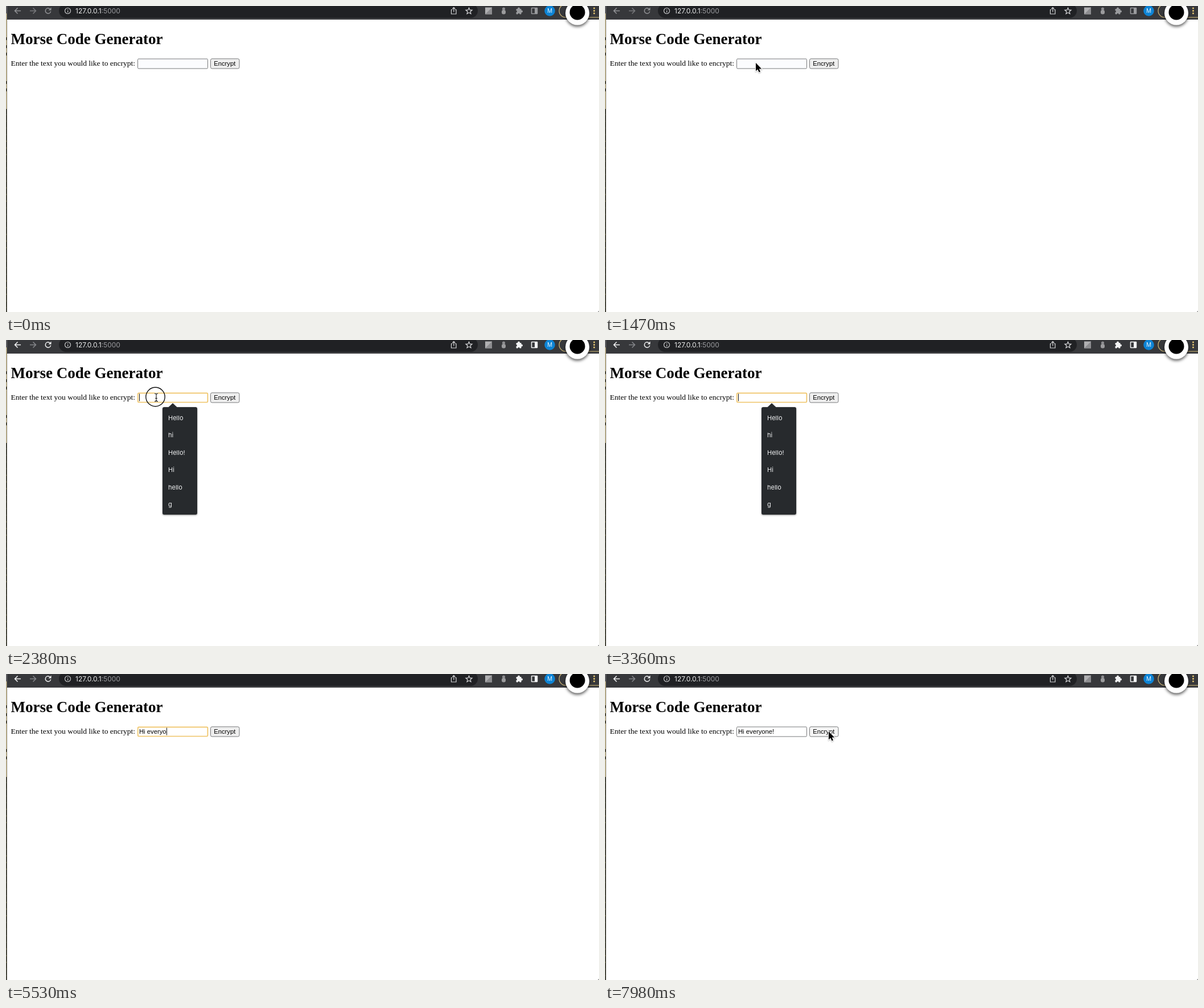
An HTML page with a canvas for the animation above (8000 ms loop, 1042 by 538 pixels).

```html
<!DOCTYPE html>
<html lang="en">
<head>
<meta charset="utf-8">
<title>Morse Code Generator</title>
<style>
html, body { margin: 0; width: 100%; height: 100%; overflow: hidden; background: #fff; }
canvas { display: block; width: 1042px; height: 538px; }
</style>
</head>
<body>
<canvas id="stage" width="1042" height="538"></canvas>
<script>
const ctx = document.getElementById('stage').getContext('2d');
const LOOP = 8000, STEP = 70;
const SERIF = '"Liberation Serif", serif';
const SANS = '"Liberation Sans", sans-serif';
const UI = 'Inter, sans-serif';

const ACTIVATE = 1540, FOCUS = 2310, MENU = 2380, HIDE = 2660, SHOW = 7000, SUBMIT = 7910, BLUR = 7980;
const MESSAGE = 'Hi everyone!';
const KEYS = [3570, 3920, 4130, 4340, 4550, 4620, 5040, 5250, 5530, 5670, 5810, 6510];
const MENUS = [
  ['Hello', 'hi', 'Hello!', 'Hi', 'hello', 'g'],
  ['Hello', 'hi', 'Hello!', 'Hi', 'hello', 'Hi!'],
  ['hi', 'Hi', 'Hi!']
];

// Pointer way points: time, x, y
const PATH_IN = [[350, 2, 464], [560, 70, 340], [770, 175, 195], [980, 245, 115],
  [1120, 262, 101], [1260, 265, 100], [1540, 265, 100], [1680, 264, 101], [2520, 264, 101], [2590, 260, 100]];
const PATH_OUT = [[7000, 246, 100], [7210, 175, 99], [7350, 215, 99], [7560, 340, 98],
  [7700, 384, 98], [7770, 393, 101]];

function at(path, t) {
  const i = path.findIndex(p => p[0] > t);
  if (i < 0) return path[path.length - 1].slice(1);
  if (i === 0) return path[0].slice(1);
  const a = path[i - 1], b = path[i], k = (t - a[0]) / (b[0] - a[0]);
  return [a[1] + (b[1] - a[1]) * k, a[2] + (b[2] - a[2]) * k];
}

function text(str, x, y, font, color, align = 'left') {
  ctx.font = font;
  ctx.fillStyle = color;
  ctx.textAlign = align;
  ctx.fillText(str, x, y);
}

function rect(x, y, w, h, color) {
  ctx.fillStyle = color;
  ctx.fillRect(x, y, w, h);
}

function round(x, y, w, h, r, fill, stroke, width = 1) {
  ctx.beginPath();
  ctx.roundRect(x, y, w, h, r);
  if (fill) { ctx.fillStyle = fill; ctx.fill(); }
  if (stroke) { ctx.strokeStyle = stroke; ctx.lineWidth = width; ctx.stroke(); }
}

function disc(x, y, r, color) {
  ctx.beginPath();
  ctx.arc(x, y, r, 0, 7);
  ctx.fillStyle = color;
  ctx.fill();
}

function ring(x, y, r, color, width) {
  ctx.beginPath();
  ctx.arc(x, y, r, 0, 7);
  ctx.strokeStyle = color;
  ctx.lineWidth = width;
  ctx.stroke();
}

function line(d, color, width) {
  ctx.strokeStyle = color;
  ctx.lineWidth = width;
  ctx.stroke(new Path2D(d));
}

function shadow(color, blur, y) {
  ctx.shadowColor = color;
  ctx.shadowBlur = blur;
  ctx.shadowOffsetY = y;
}

function leftEdge() {
  rect(0, 0, 1.5, 24, '#57575a');
  rect(0, 13, 1.5, 168, '#d8c795');
  for (const y of [55, 69, 82, 132, 145]) rect(0, y, 1.5, 5, '#3a3524');
  rect(0, 181, 1.5, 357, '#2c2d22');
  for (let i = 0; i < 30; i++) {
    rect(0, 190 + i * 11.7, 1, 2, i % 7 > 3 ? '#6a6338' : '#454632');
  }
  rect(1.3, 24, 0.7, 514, '#54524a');
}

function star(x, y, r) {
  ctx.beginPath();
  for (let i = 0; i < 10; i++) {
    const a = i * Math.PI / 5 - Math.PI / 2, q = i % 2 ? r * 0.45 : r;
    ctx.lineTo(x + q * Math.cos(a), y + q * Math.sin(a));
  }
  ctx.closePath();
  ctx.strokeStyle = '#dcdddf';
  ctx.lineWidth = 1.2;
  ctx.stroke();
}

function toolbar(active) {
  const ink = active ? '#f2f3f4' : '#929396', faint = active ? '#85868a' : '#77787b';
  rect(1.5, 0, 1040.5, 24, '#37383b');
  rect(1.5, 23, 1040.5, 1, '#4b4c4f');
  round(93, -4, 736, 25, 12.5, '#202124');

  line('M26 8.5H15.5M20.5 3.5L15.5 8.5L20.5 13.5', ink, 1.5);
  line('M42 8.5H52.5M47.5 3.5L52.5 8.5L47.5 13.5', faint, 1.5);
  ctx.beginPath();
  ctx.arc(74, 8.5, 4.7, 0.2, 5.4);
  ctx.strokeStyle = ink;
  ctx.lineWidth = 1.5;
  ctx.stroke();
  ctx.fillStyle = ink;
  ctx.fill(new Path2D('M79.5 2.5V7.5H74.5Z'));

  ring(108.5, 8.5, 5, '#c3c4c6', 1.2);
  rect(108, 8, 1.2, 3.5, '#c3c4c6');
  rect(108, 5.6, 1.2, 1.3, '#c3c4c6');
  text('127.0.0.1', 122, 13, '12px ' + UI, '#eceded');
  const w = ctx.measureText('127.0.0.1').width;
  text(':5000', 122 + w, 13, '12px ' + UI, '#9b9ca0');

  line('M784.5 6.5H782.5V14H791V6.5H789M786.8 10.5V2.5M784.3 5L786.8 2.5L789.3 5', '#d4d5d7', 1.2);
  star(813.5, 9, 5.8);

  rect(842, 2.5, 12, 12, '#b0b0b2');
  ctx.fillStyle = '#8d8d90';
  ctx.fill(new Path2D('M854 2.5V14.5H842Z'));
  disc(874.5, 5, 2.6, '#8c8c8f');
  round(871, 7, 7, 7.5, 3, '#9b9b9d');

  const piece = active ? '#f2f3f4' : '#9a9b9e';
  round(896.5, 5, 9, 9.5, 1, piece);
  disc(901, 4.5, 2, piece);
  disc(906, 9.5, 2, piece);
  disc(896.5, 9.5, 1.5, '#37383b');
  disc(901, 14.3, 1.5, '#37383b');
  round(923.5, 3.5, 10, 10, 0.5, null, piece, 1.5);
  rect(929, 3, 5, 11, piece);

  disc(955.5, 8.5, 9.3, '#0d83d4');
  text('M', 955.5, 12.2, '10px ' + UI, '#e8f3fb', 'center');
  round(972, -3, 90, 23, 11.5, null, '#d8bd79', 1.2);
  for (const y of [4, 8.5, 13]) disc(1033.5, y, 1.4, '#f0cf75');

  shadow('rgba(0,0,0,.6)', 5, 3);
  disc(1004, 12.5, 21, '#fff');
  shadow('transparent', 0, 0);
  disc(1004, 11, 13.5, '#000');
}

function form(t, typed) {
  text('Morse Code Generator', 8.5, 67, 'bold 27px ' + SERIF, '#000');
  text('Enter the text you would like to encrypt:', 8.5, 105, '13.5px ' + SERIF, '#000');

  const focused = t >= FOCUS && t < BLUR;
  if (focused) round(231.8, 93.3, 122.6, 16.2, 1.5, '#fff', '#efc365', 1.7);
  else round(231.5, 93, 123, 17, 1.5, t < ACTIVATE ? '#fbfcfe' : '#fff', '#77787a', 1);

  const value = MESSAGE.slice(0, typed);
  text(value, 234, 105, '11.25px ' + SANS, '#000');
  if (focused) {
    const since = typed ? KEYS[typed - 1] : FOCUS + 20;
    if (Math.floor(Math.max(0, t - since) / 490) % 2 === 0) {
      rect(Math.round(234 + ctx.measureText(value).width), 94.5, 1, 13, '#111');
    }
  }

  round(359.5, 92.8, 50.5, 17.2, 2.5, t >= SUBMIT ? '#f5f5f5' : '#efefef', '#77787a', 1);
  text('Encrypt', 365.2, 105, '11.25px ' + SANS, '#000');
}

function menu(items) {
  const w = items.length > 3 ? 61 : 51, h = items.length * 30.5 + 6;
  shadow('rgba(0,0,0,.45)', 3, 1);
  round(275, 118, w, h, 3, '#272a2d');
  shadow('transparent', 0, 0);
  ctx.fill(new Path2D('M285 118.5L293 111L301 118.5Z'));
  items.forEach((item, i) => text(item, 285, 140.5 + i * 30.5, '11px ' + UI, '#f1f2f3'));
}

function arrow(x, y) {
  ctx.save();
  ctx.translate(x, y);
  const p = new Path2D('M0 0V14.3L3.3 11.4L5.7 16.6L8 15.6L5.8 10.4H10.2Z');
  shadow('rgba(0,0,0,.3)', 2, 1);
  ctx.strokeStyle = '#fff';
  ctx.lineWidth = 2;
  ctx.stroke(p);
  shadow('transparent', 0, 0);
  ctx.fillStyle = '#000';
  ctx.fill(p);
  ctx.restore();
}

function beam(x, y) {
  ctx.save();
  ctx.translate(x, y);
  const d = 'M-3 -7Q0 -7 0 -5V5Q0 7 -3 7M3 -7Q0 -7 0 -5M0 5Q0 7 3 7M-1.8 1.5H1.8';
  line(d, 'rgba(255,255,255,.8)', 2.4);
  line(d, '#111', 1.1);
  ctx.restore();
}

function pointer(t) {
  if (t < 350 || (t >= HIDE && t < SHOW)) return;
  const [x, y] = at(t < HIDE ? PATH_IN : PATH_OUT, t);
  const overText = t >= ACTIVATE && x < 356;
  (overText ? beam : arrow)(x, y);
  if (t >= ACTIVATE && t < ACTIVATE + 70 || t >= FOCUS && t < FOCUS + 140) {
    ring(262.5, 100, 16.7, '#111', 1.4);
  }
  if (t >= SUBMIT && t < BLUR) ring(393, 101.5, 21.3, '#111', 1.4);
}

function draw(ms) {
  const t = Math.floor(ms % LOOP / STEP) * STEP;
  const typed = KEYS.filter(k => k <= t).length;
  rect(0, 0, 1042, 538, '#fff');
  leftEdge();
  toolbar(t >= ACTIVATE);
  rect(1040.5, 536.5, 1.5, 1.5, '#777');
  form(t, typed);
  if (t >= MENU && typed < MENUS.length) menu(MENUS[typed]);
  pointer(t);
}

const start = performance.now();
function tick() {
  draw(performance.now() - start);
  requestAnimationFrame(tick);
}
tick();
</script>
</body>
</html>
```
